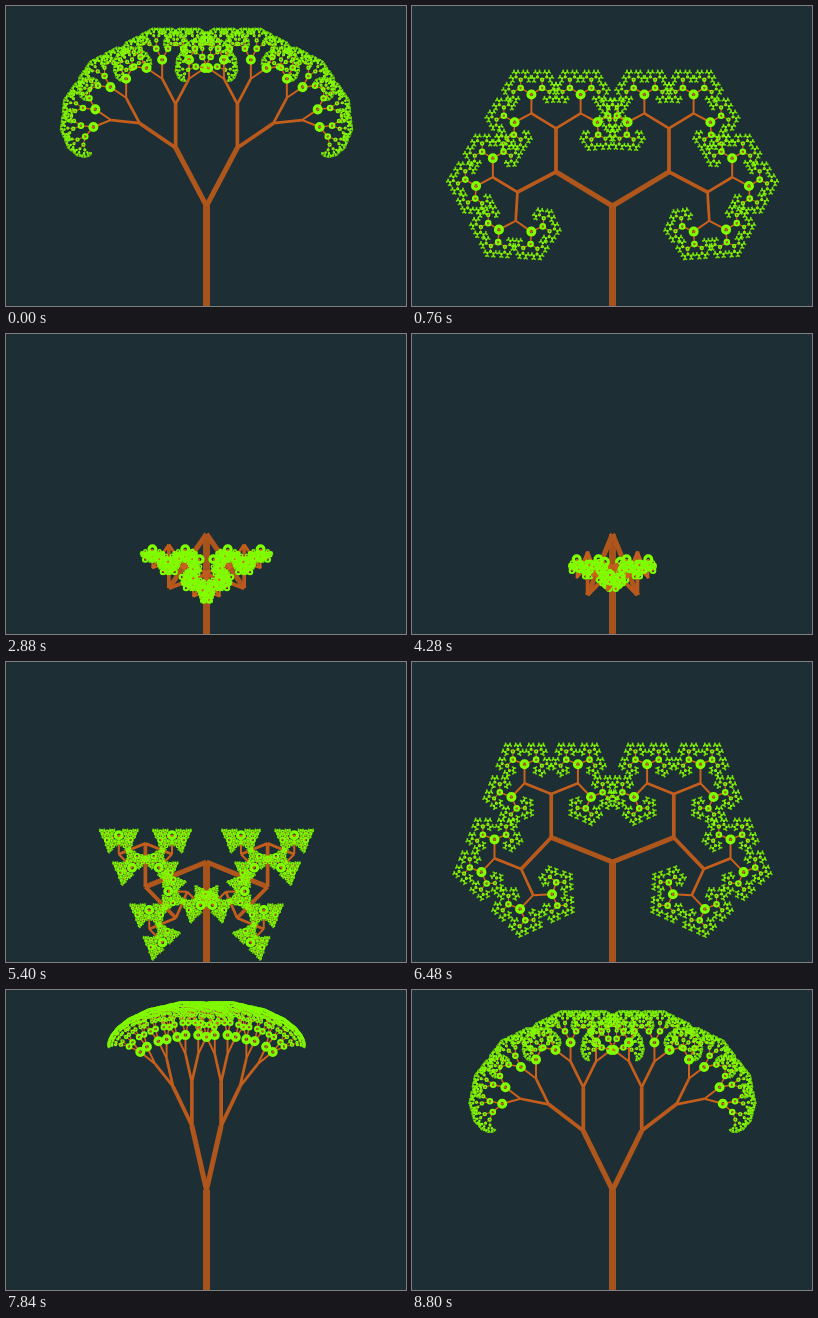
Write an HTML page with a canvas that moves like this. It is 400 px wide and 300 px high and loops after 8840 ms.

```html
<!DOCTYPE html>
<html lang="en">
<head>
<meta charset="utf-8">
<title>Turning fractal tree</title>
<style>
  html, body { margin: 0; width: 100%; height: 100%; overflow: hidden; background: #1d2e34; }
  canvas { display: block; }
</style>
</head>
<body>
<canvas id="stage" width="400" height="300"></canvas>
<script>
const ctx = document.getElementById('stage').getContext('2d');
const LOOP = 8840, STEP = 40;
const TRUNK = 100, RATIO = 0.66;
const TRUNK_WIDTH = 7, TAPER = 0.73;
const DEPTH = 10, FIRST_LEAF = 4;
const START_ANGLE = 27.9 * Math.PI / 180;

const bark = level => {
  const d = Math.min(level, 5);
  return `rgb(${165 + 10 * d}, ${82 + 4 * d}, 28)`;
};

function leaf(x, y, length) {
  ctx.strokeStyle = '#7fff00';
  ctx.lineWidth = Math.max(1.25, length * 0.17);
  ctx.beginPath();
  ctx.arc(x, y, length * 0.18, 0, 2 * Math.PI);
  ctx.stroke();
}

function branch(x, y, direction, spread, level) {
  const length = TRUNK * RATIO ** level;
  const tipX = x + length * Math.sin(direction);
  const tipY = y - length * Math.cos(direction);

  ctx.strokeStyle = bark(level);
  ctx.lineWidth = TRUNK_WIDTH * TAPER ** level;
  ctx.beginPath();
  ctx.moveTo(x, y);
  ctx.lineTo(tipX, tipY);
  ctx.stroke();

  if (level < DEPTH) {
    branch(tipX, tipY, direction - spread, spread, level + 1);
    branch(tipX, tipY, direction + spread, spread, level + 1);
  }
  // Leaves go over the twigs that grow from the same point.
  if (level >= FIRST_LEAF) leaf(tipX, tipY, length);
}

function draw(time) {
  const stepped = Math.floor((time % LOOP + 1) / STEP) * STEP;
  ctx.fillStyle = '#1d2e34';
  ctx.fillRect(0, 0, 400, 300);
  branch(200.5, 300, 0, START_ANGLE + 2 * Math.PI * stepped / LOOP, 0);
}

const start = performance.now();
function tick() {
  draw(performance.now() - start);
  requestAnimationFrame(tick);
}
tick();
</script>
</body>
</html>
```
